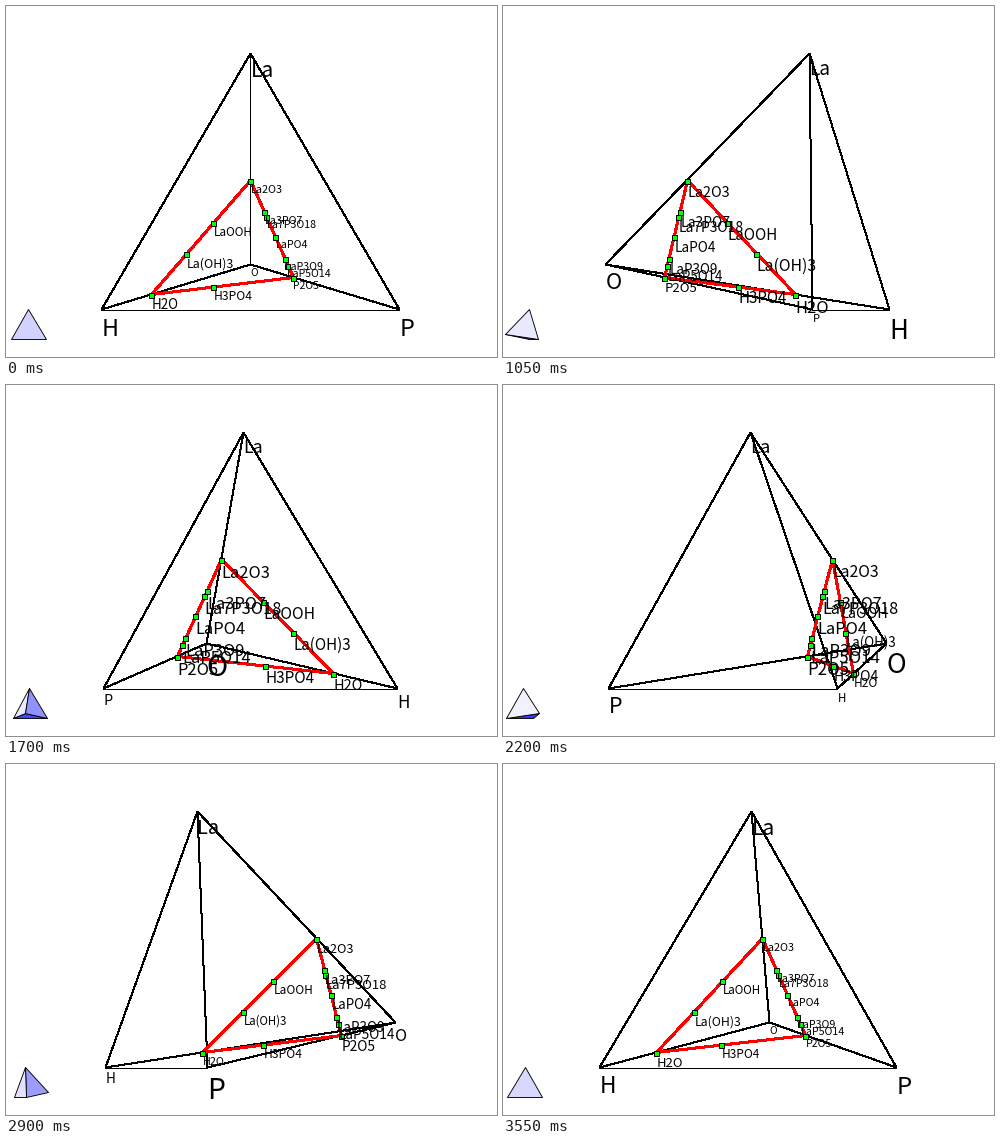
These frames come from a looping animation (491 px wide and 351 px high, 3600 ms). A matplotlib script:

```python
import matplotlib.pyplot as plt
import numpy as np
from matplotlib.animation import FuncAnimation
from matplotlib.patches import Polygon

W, H = 491, 351
DPI = 64
PT = 72 / DPI  # points per pixel
FRAMES = 72
CENTER_X = 244.2
FONT = "Noto Sans CJK JP"

# Regular tetrahedron: screen y points down, z points at the viewer.
ELEMENTS = ["La", "H", "P", "O"]
VERTS = np.array([
    [0, 47, -43],
    [-149, 303, 0],
    [149, 303, 0],
    [0, 258, -254],
], float)
CENTROID = VERTS.mean(axis=0)
EDGES = [(0, 1), (0, 2), (0, 3), (1, 2), (1, 3), (2, 3)]

# Atom counts in the order of ELEMENTS
COMPOUNDS = {
    "La2O3": (2, 0, 0, 3),
    "La3PO7": (3, 0, 1, 7),
    "La7P3O18": (7, 0, 3, 18),
    "LaPO4": (1, 0, 1, 4),
    "LaP3O9": (1, 0, 3, 9),
    "LaP5O14": (1, 0, 5, 14),
    "P2O5": (0, 0, 2, 5),
    "H3PO4": (0, 3, 1, 4),
    "H2O": (0, 2, 0, 1),
    "La(OH)3": (1, 3, 0, 3),
    "LaOOH": (1, 1, 0, 2),
}
NAMES = list(COMPOUNDS)
COUNTS = np.array(list(COMPOUNDS.values()), float)
MIX = COUNTS / COUNTS.sum(axis=1, keepdims=True)
TIE_LINES = [("La2O3", "P2O5"), ("P2O5", "H2O"), ("H2O", "La2O3")]

# Small orientation marker in the corner
ICON_X, ICON_Y, ICON_SCALE = 22.4, 303, 0.1174


def rotate(points, angle):
    x, y, z = points.T
    c, s = np.cos(angle), np.sin(angle)
    return np.column_stack([x * c + z * s, y, z * c - x * s])


def snap(points):
    return np.round(points[:, :2])


def shade(normal):
    """Blue-white face colour, lit from the upper left."""
    x, y, z = normal
    v = 0.49 - 0.27 * x - 0.29 * y + 0.29 * z
    v = float(np.clip(v, 0, 1))
    return (v, v, 1.0)


fig = plt.figure(figsize=(W / DPI, H / DPI), dpi=DPI, facecolor="white")
ax = fig.add_axes([0, 0, 1, 1])
ax.set_xlim(-0.5, W - 0.5)
ax.set_ylim(H - 0.5, -0.5)
ax.axis("off")


def make_line(color, width, order):
    return ax.plot([], [], color=color, lw=width * PT, zorder=order,
                   antialiased=False, solid_capstyle="butt")[0]


def make_label(text):
    return ax.text(0, 0, text, family=FONT, color="black", ha="left",
                   va="baseline", zorder=5)


edge_lines = [make_line("black", 1, 2) for _ in EDGES]
tie_lines = [make_line("red", 2, 3) for _ in TIE_LINES]
dots, = ax.plot([], [], "s", ms=5 * PT, mfc="#00ff00", mec="black",
                mew=1 * PT, zorder=4, antialiased=False)
corner_labels = [make_label(e) for e in ELEMENTS]
compound_labels = [make_label(c) for c in NAMES]
faces = [ax.add_patch(Polygon([(0, 0)] * 3, closed=True, ec="black",
                              lw=0.9 * PT, zorder=2, joinstyle="round"))
         for _ in ELEMENTS]


def place_label(label, point, size):
    label.set_position((point[0], point[1] + 1.079 * size))
    label.set_fontsize(0.96 * size * PT)


def draw_icon(turned):
    pts = np.column_stack([
        ICON_X + turned[:, 0] * ICON_SCALE,
        ICON_Y + (turned[:, 1] - turned[0, 1]) * ICON_SCALE,
    ])
    for i, face in enumerate(faces):
        # In a regular tetrahedron each face looks away from its far corner.
        normal = -turned[i] / np.linalg.norm(turned[i])
        face.set_visible(bool(normal[2] > 0.01))
        face.set_xy(np.round(np.delete(pts, i, axis=0)))
        face.set_facecolor(shade(normal))


def update(i):
    turned = rotate(VERTS - CENTROID, 2 * np.pi * i / FRAMES)
    draw_icon(turned)

    # Keep the solid centred on its own horizontal extent.
    xs = turned[:, 0]
    shift = [CENTER_X - (xs.min() + xs.max()) / 2, CENTROID[1], 0]
    corners = turned + shift
    spots = MIX @ corners
    corner_px, spot_px = snap(corners), snap(spots)

    for line, pair in zip(edge_lines, EDGES):
        line.set_data(*corner_px[list(pair)].T)
    for line, pair in zip(tie_lines, TIE_LINES):
        line.set_data(*spot_px[[NAMES.index(c) for c in pair]].T)
    dots.set_data(*spot_px.T)

    # Nearer labels are larger.
    for label, p, z in zip(corner_labels, corner_px, corners[:, 2]):
        place_label(label, p, 20.3 + 0.054 * z)
    for label, p, z in zip(compound_labels, spot_px, spots[:, 2]):
        place_label(label, p, 14.2 + 0.031 * z)
    return []


anim = FuncAnimation(fig, update, frames=FRAMES, interval=50,
                     init_func=lambda: update(0), repeat=True,
                     repeat_delay=0, blit=False)
plt.show()
```
